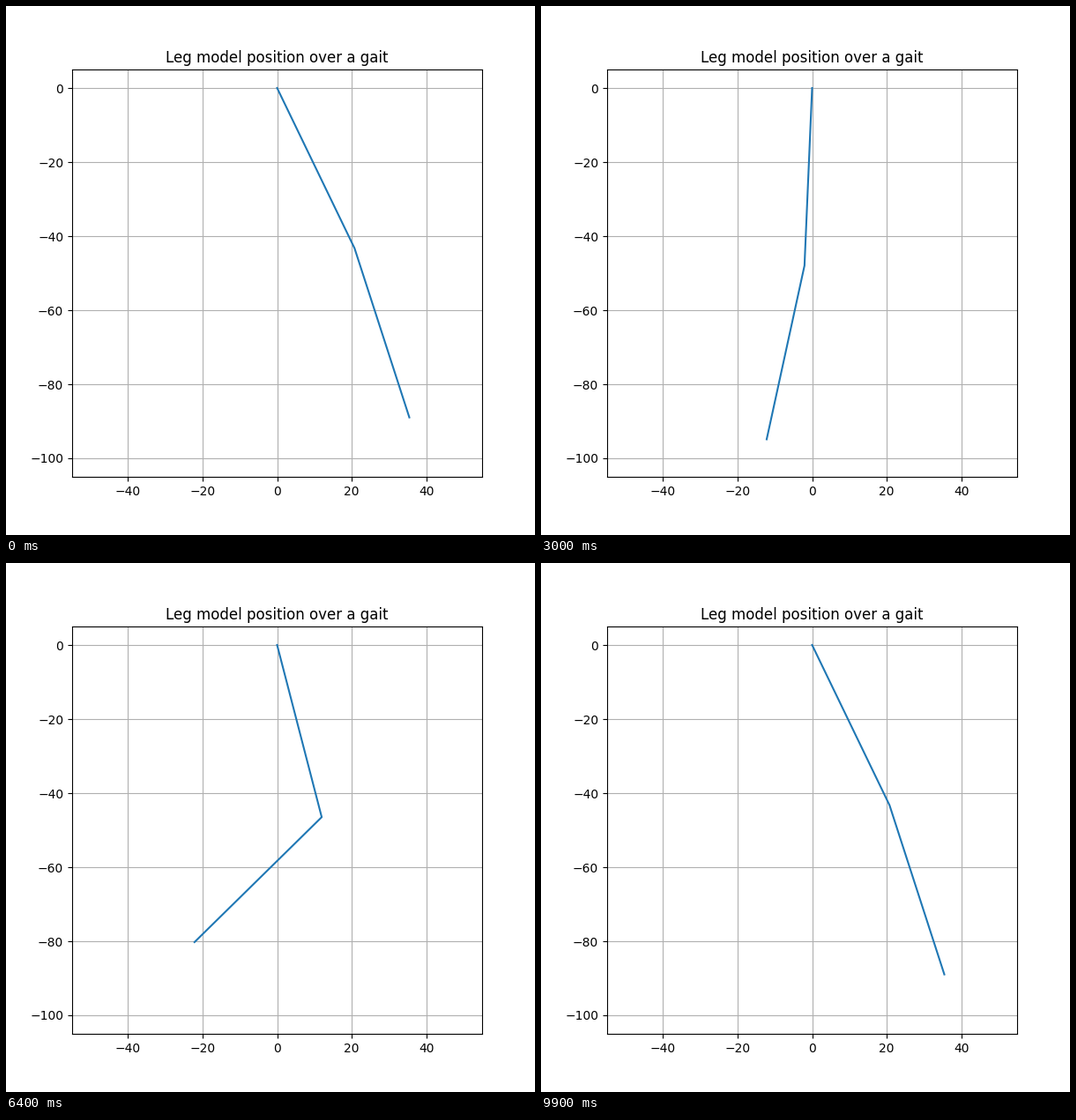
Recreate the animation shown at these times as a matplotlib script. Size 600 by 600 pixels, loop 10000 ms.

```python
import numpy as np
import matplotlib.pyplot as plt
from matplotlib.animation import FuncAnimation

FRAMES = 100
INTERVAL = 100
LINK = 48  # length of thigh and shin


def wave(amp, deg):
    return amp * np.cos(np.radians(deg))


def hip_angle(p):
    """Swing of the thigh from the vertical, in degrees."""
    return (12.53 + wave(21.53, p + 40.35) + wave(3.76, 2 * p + 170.8)
            + wave(0.44, 3 * p - 17.8))


def knee_angle(p):
    """Bend of the knee, in degrees: small in stance, large in swing."""
    return (25.02 + wave(22.58, p + 117.4) + wave(12.6, 2 * p - 126.3)
            + wave(0.71, 3 * p + 25.8))


def leg(p):
    """Hip, knee and foot positions at gait phase p, in degrees."""
    thigh = hip_angle(p)
    shin = thigh - knee_angle(p)
    angles = np.radians([thigh, shin])
    x = np.append(0, np.cumsum(LINK * np.sin(angles)))
    y = np.append(0, np.cumsum(-LINK * np.cos(angles)))
    return x, y


fig, ax = plt.subplots(figsize=(6, 6), dpi=100)
ax.set_xlim(-55, 55)
ax.set_ylim(-105, 5)
ax.set_title("Leg model position over a gait")
ax.grid(True)
line, = ax.plot(*leg(0))


def update(i):
    line.set_data(*leg(360 * i / (FRAMES - 1)))
    return line,


anim = FuncAnimation(fig, update, frames=FRAMES, interval=INTERVAL,
                     repeat=True, repeat_delay=0)
plt.show()
```
